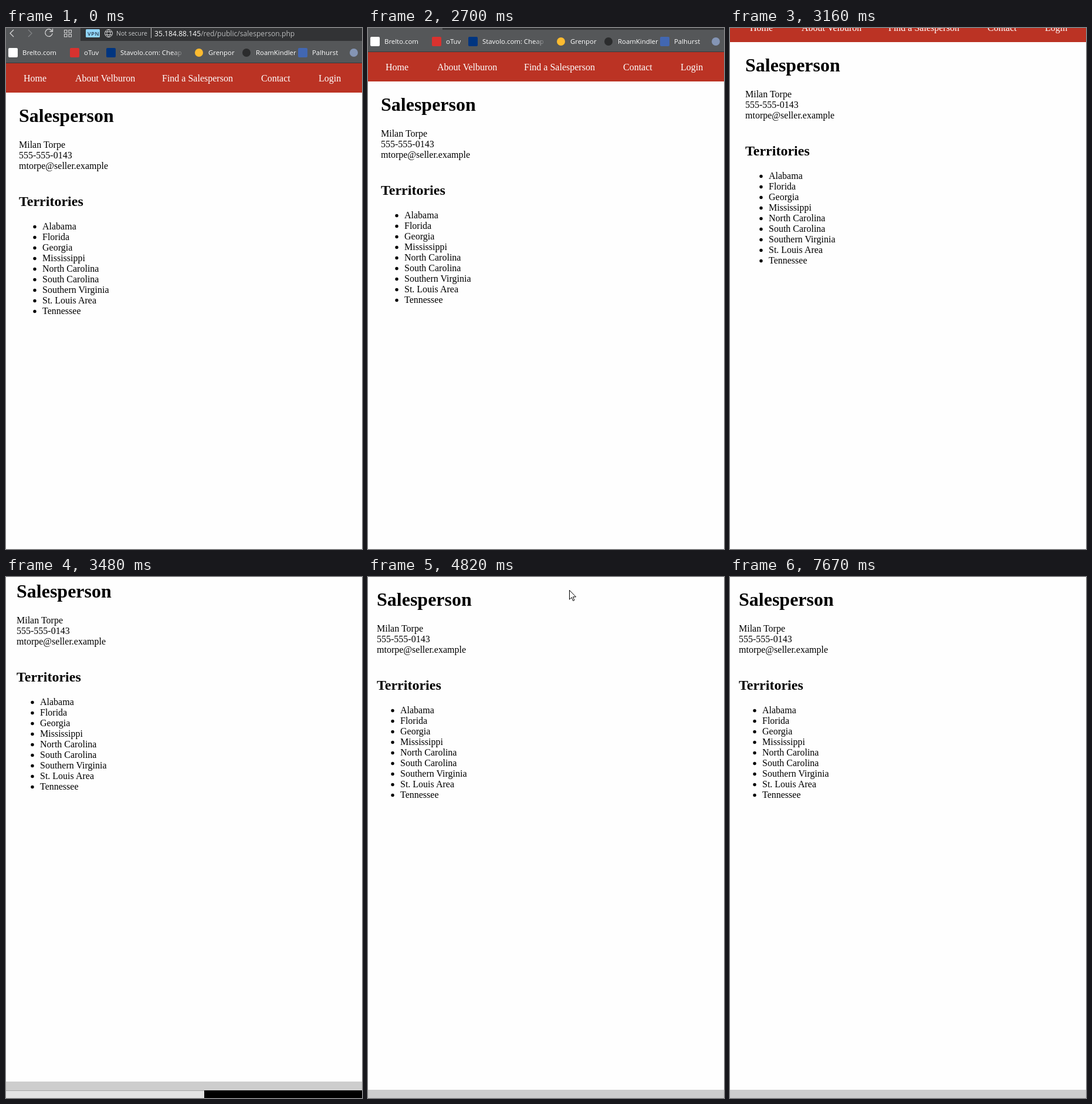
An HTML page that plays this animation: 607x887 px, repeating every 8 s.

```html
<!DOCTYPE html>
<html lang="en">
<head>
<meta charset="utf-8">
<title>Salesperson</title>
<style>
  html, body { margin: 0; width: 100%; height: 100%; overflow: hidden; background: #fefefe; }
  svg { display: block; }
  text { white-space: pre; }
  .page { font: 16px "Liberation Serif", serif; }
  .page .h1 { font-size: 32px; font-weight: bold; }
  .page .h2 { font-size: 24px; font-weight: bold; }
  .nav { fill: #fff; }
  .bar { font: 11.4px "Open Sans", sans-serif; fill: #fff; }
  .icon { fill: none; stroke: #d6d6d7; stroke-width: 1.3; }
</style>
</head>
<body>
<svg width="607" height="887" viewBox="0 0 607 887">
  <defs>
    <linearGradient id="fade">
      <stop offset="0" stop-color="#555759" stop-opacity="0"/>
      <stop offset="1" stop-color="#555759"/>
    </linearGradient>
  </defs>
  <g id="screen">
    <g id="toolbar">
      <rect x="-20" y="-10" width="660" height="70" fill="#555759"/>
      <rect x="127" y="-10" width="500" height="32" fill="#323335"/>
      <rect x="-20" y="59" width="660" height="1" fill="#38393b"/>
      <g class="icon">
        <path d="M13 3L7 9L13 15"/>
        <path d="M38 3L44 9L38 15" stroke="#828486"/>
        <path d="M78.4 5A6.2 6.2 0 1 0 79.2 9M79.5 1V6H74.5"/>
        <path d="M99.5 3.5h4.5v4.5h-4.5zM107 3.5h4.5v4.5H107zM99.5 10.5h4.5v4.5h-4.5zM107 10.5h4.5v4.5H107z" stroke-width="1.1"/>
        <path d="M168.5 9a6.5 6.5 0 1 0 13 0a6.5 6.5 0 1 0-13 0M175 2.5c-4 4-4 9 0 13c4-4 4-9 0-13M169.5 6.5h11M169.5 11.5h11" stroke-width="1"/>
      </g>
      <rect x="136" y="2" width="24" height="14" rx="1.5" fill="#91d5fa"/>
      <text class="bar" x="139" y="12.5" style="font-size:9px;font-weight:600;letter-spacing:.7px;fill:#243746">VPN</text>
      <text class="bar" x="188" y="13" style="font-size:10.5px;fill:#c9cacb">Not secure</text>
      <rect x="247" y="0" width="1" height="17" fill="#c4c5c6"/>
      <text class="bar" x="253" y="14" style="font-size:12.15px">35.184.88.145<tspan fill="#b9babb">/red/public/salesperson.php</tspan></text>
    </g>
    <g class="page" id="page">
      <rect x="-20" y="60" width="660" height="50" fill="#bb3324"/>
      <text class="h1" x="22" y="160">Salesperson</text>
      <text class="h2" x="22" y="303">Territories</text>
      <rect x="-20" y="984" width="660" height="15" fill="#cdcdcd"/>
      <rect x="-20" y="999" width="362" height="40" fill="#e4e4e4"/>
      <rect x="-20" y="999" width="362" height="1" fill="#a8a8a8"/>
      <rect x="342" y="999" width="300" height="40" fill="#000"/>
    </g>
  </g>
  <path id="cursor" d="M.5.5V16.2L4.2 12.8L6.6 18.5L8.9 17.5L6.5 11.9H11.5Z" fill="#fff" stroke="#000"/>
</svg>
<script>
const LOOP = 8000;
const byId = id => document.getElementById(id);

function add(parent, tag, attrs, text = '') {
  const node = document.createElementNS('http://www.w3.org/2000/svg', tag);
  for (const name in attrs) node.setAttribute(name, attrs[name]);
  node.textContent = text;
  byId(parent).append(node);
}

// label, text x, marker centre, marker colour, marker shape
const bookmarks = [
  ['Brelto.com', 28, 12, '#ffffff', 'square'],
  ['oTuv', 133, 117, '#d8322f', 'square'],
  ['Stavolo.com: Cheap', 195, 179, '#003580', 'square'],
  ['Grenpor', 345, 329, '#fdbb30', 'circle'],
  ['RoamKindler', 426, 410, '#2b2c2d', 'circle'],
  ['Palhurst', 522, 506, '#4267b2', 'square'],
  ['', 607, 593, '#8495b5', 'circle']
];
for (const [label, x, mark, fill, shape] of bookmarks) {
  if (shape === 'square') add('toolbar', 'rect', { x: mark - 8, y: 34, width: 16, height: 16, rx: 2, fill });
  else add('toolbar', 'circle', { cx: mark, cy: 42, r: 7, fill });
  add('toolbar', 'text', { class: 'bar', x, y: 46 }, label);
}
add('toolbar', 'rect', { x: 284, y: 32, width: 20, height: 20, fill: 'url(#fade)' });
add('toolbar', 'rect', { x: 304, y: 32, width: 14, height: 20, fill: '#555759' });

const links = { 'Home': 30, 'About Velburon': 118, 'Find a Salesperson': 266, 'Contact': 435, 'Login': 533 };
for (const label in links) add('page', 'text', { class: 'nav', x: links[label], y: 91 }, label);

['Milan Torpe', '555-555-0143', 'mtorpe@seller.example']
  .forEach((line, i) => add('page', 'text', { x: 22, y: 204 + 18 * i }, line));

['Alabama', 'Florida', 'Georgia', 'Mississippi', 'North Carolina', 'South Carolina',
 'Southern Virginia', 'St. Louis Area', 'Tennessee'].forEach((name, i) => {
  const y = 343 + 18 * i;
  add('page', 'circle', { cx: 49, cy: y - 4.5, r: 2.7 });
  add('page', 'text', { x: 62, y }, name);
});

// Stepped tracks: [start ms, x, y]; a cursor step without a position hides it.
const pan = [
  [0, 0, 0], [160, 0, -1], [2700, 0, -19], [3000, 2, -41], [3160, 4, -86], [3320, 2, -95],
  [3480, -4, -125], [3640, -5, -121], [3770, -6, -117], [3920, -7, -114], [4070, -7, -111]
];
const pointer = [
  [0], [640, 266, 630], [770, 340, 290], [900, 390, 0], [1020],
  [4530, 326, 479], [4670, 346, 148], [4820, 343, 22], [4980, 354, -18], [5300],
  [6050, 348, 0], [6210, 343, 17], [6350, 418, 0], [6480, 580, 4], [6760, 596, 8], [6880],
  [7280, 528, 68], [7410, 490, 75], [7670]
];
const stepAt = (track, t) => track.findLast(step => step[0] <= t);

function place(id, [, x, y]) {
  const node = byId(id);
  node.style.display = x === undefined ? 'none' : '';
  if (x !== undefined) node.setAttribute('transform', `translate(${x} ${y})`);
}

const start = performance.now();
function draw() {
  const t = (performance.now() - start) % LOOP;
  place('screen', stepAt(pan, t));
  place('cursor', stepAt(pointer, t));
  requestAnimationFrame(draw);
}
draw();
</script>
</body>
</html>
```
